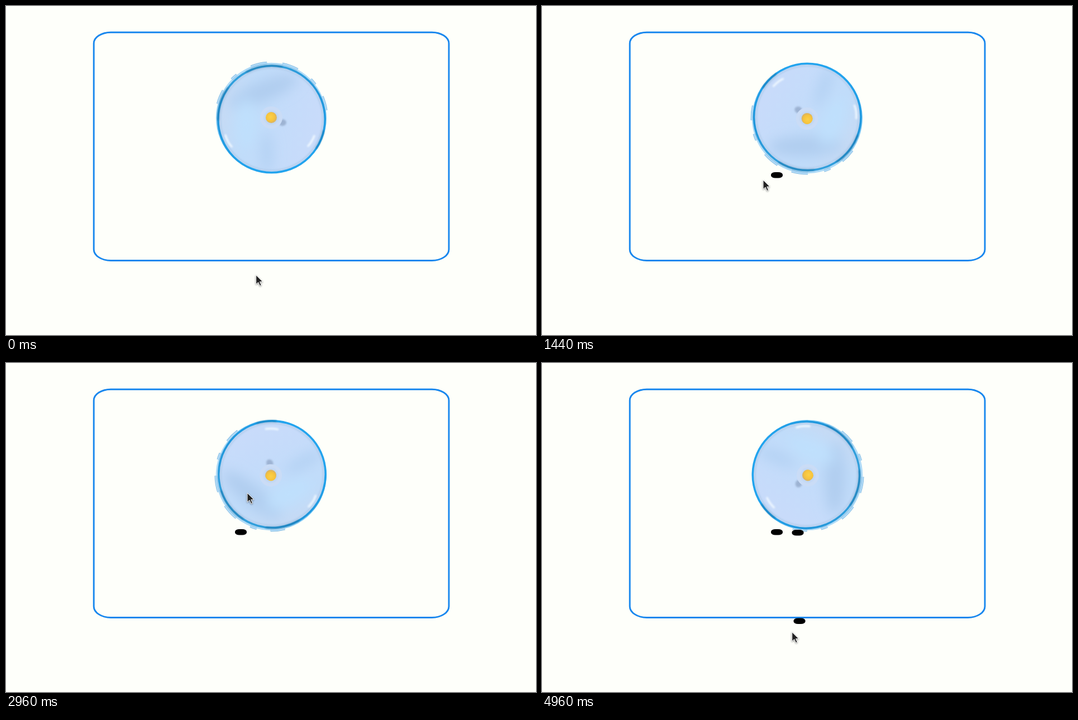
An HTML page that plays this animation: 949x590 px, repeating every 5.12 s.

```html
<!DOCTYPE html>
<html lang="en">
<head>
<meta charset="utf-8">
<title>Spinning wheel</title>
<style>
  html, body { margin: 0; width: 100%; height: 100%; overflow: hidden; background: #fefffa; }
  svg { position: absolute; left: 0; top: 0; }
  .box { fill: none; stroke: #1887ee; stroke-width: 2.9; }
  .edge { fill: none; stroke: #80b8de; stroke-width: 4.5; }
  .grip { fill: none; stroke: #b0daf7; stroke-width: 3; }
  .glint { fill: none; stroke: #eef7ff; stroke-width: 3.5; stroke-linecap: round; }
  .shade { fill: none; stroke: #17679a; stroke-width: 2.5; opacity: .65; }
  #cursor { filter: drop-shadow(0 1.5px 1.5px #0007); }
</style>
</head>
<body>
<svg width="949" height="590" viewBox="0 0 949 590">
  <defs>
    <linearGradient id="lip" x1="0" y1="0" x2="0" y2="1">
      <stop offset=".2" stop-color="#b0dbf7"/>
      <stop offset="1" stop-color="#55bdf6"/>
    </linearGradient>
    <linearGradient id="rim" x1="0" y1="0" x2=".3" y2="1">
      <stop offset="0" stop-color="#3aa3dc"/>
      <stop offset=".5" stop-color="#2096da"/>
      <stop offset="1" stop-color="#22a4ee"/>
    </linearGradient>
    <linearGradient id="face" x1="0" y1=".4" x2="1" y2=".6">
      <stop offset="0" stop-color="#c6daf4"/>
      <stop offset=".3" stop-color="#c0dcfa"/>
      <stop offset="1" stop-color="#c9dbfa"/>
    </linearGradient>
    <radialGradient id="pin" cx=".42" cy=".45">
      <stop offset="0" stop-color="#fbd04a"/>
      <stop offset=".75" stop-color="#f6c33c"/>
      <stop offset="1" stop-color="#dfb65c"/>
    </radialGradient>
    <clipPath id="inside"><circle cx=".5" cy="2" r="95"/></clipPath>
    <filter id="soft" x="-60%" y="-60%" width="220%" height="220%"><feGaussianBlur stdDeviation="11"/></filter>
    <filter id="blur" x="-60%" y="-60%" width="220%" height="220%"><feGaussianBlur stdDeviation="1.4"/></filter>
  </defs>

  <rect class="box" x="157.2" y="47.2" width="635.8" height="409.3" rx="30.5" ry="20"/>

  <g id="wheel">
    <circle cy="-.3" r="99" fill="url(#lip)"/>
    <g id="grips"></g>
    <circle cx=".5" cy="2" r="95.5" fill="url(#face)"/>
    <g clip-path="url(#inside)">
      <g filter="url(#soft)">
        <ellipse cx="5" cy="-50" rx="65" ry="18" fill="#b0cdef" transform="rotate(-22)"/>
        <ellipse cx="-45" cy="10" rx="18" ry="45" fill="#bfe0fd"/>
        <ellipse cx="-8" cy="62" rx="10" ry="38" fill="#b3d1f3"/>
      </g>
      <circle cx=".5" cy="2" r="92" fill="none" stroke="#b3cdec" stroke-width="3" filter="url(#blur)"/>
      <g filter="url(#blur)">
        <path class="glint" d="M-82 31Q-78 44-71 51M77 32Q72 44 66 50"/>
      </g>
    </g>
    <circle cx=".5" cy="2" r="95.7" fill="none" stroke="url(#rim)" stroke-width="3.6"/>
    <path class="shade" filter="url(#blur)" d="M-95 4A95.5 95.5 0 0 1-77-55M-45-82A95.5 95.5 0 0 1 20-92M94 22A95.5 95.5 0 0 1 80 55"/>
    <ellipse cx="20" cy="8" rx="7" ry="6" fill="#9db3d3" filter="url(#blur)"/>
    <circle r="20" cy="-1" fill="#cadcf6"/>
    <circle r="13" cy="-1" fill="#bfd6f3" filter="url(#blur)"/>
    <circle r="10" cy="-1" fill="url(#pin)"/>
  </g>

  <g id="drops"></g>
  <path id="cursor" d="M0 0V16.5L4 13 7 19.5 9.5 18.3 6.8 12H12Z" fill="#222" stroke="#fff" stroke-width="1"/>
</svg>
<script>
  const LOOP = 5120, STEP = 80, SPEED = 0.7; // degrees per ms
  const hovers = [[741, 1028], [2903, 3292]];
  const exits = [...hovers.map(hover => hover[1]), 4530];

  // Time, x, y of the turning points of the pointer
  const stops = [
    [0, 447.7, 482.5], [880, 473.5, 240.5], [1028, 410, 298], [1440, 396, 312],
    [1800, 379, 331], [2400, 399, 273], [2960, 432, 233], [3292, 447.5, 299],
    [3920, 452, 359], [4530, 450.5, 457.5], [4960, 447.7, 482.5]
  ];

  const $ = id => document.getElementById(id);
  const svgEl = (parent, tag, attrs) => {
    const el = document.createElementNS("http://www.w3.org/2000/svg", tag);
    for (const key in attrs) el.setAttribute(key, attrs[key]);
    return parent.appendChild(el);
  };

  // Slope at a stop, zero at both ends
  function slope(i, axis) {
    const before = stops[i - 1], after = stops[i + 1];
    return before && after ? (after[axis] - before[axis]) / (after[0] - before[0]) : 0;
  }

  // Smooth curve through the stops
  function pointer(t) {
    const i = Math.max(0, stops.findIndex(stop => stop[0] >= t) - 1);
    const a = stops[i], b = stops[i + 1];
    const span = b[0] - a[0], u = (t - a[0]) / span, v = 1 - u;
    return [1, 2].map(axis =>
      a[axis] * v * v * (1 + 2 * u) + b[axis] * u * u * (3 - 2 * u) +
      span * u * v * (v * slope(i, axis) - u * slope(i + 1, axis)));
  }

  // The wheel turns only while the pointer is over it
  const angle = t => SPEED * hovers.reduce(
    (sum, [enter, leave]) => sum + Math.max(0, Math.min(t, leave) - enter), 0);

  const rimPoint = deg => {
    const a = deg * Math.PI / 180;
    return `${99.3 * Math.cos(a)} ${99.3 * Math.sin(a)}`;
  };
  for (const side of [-1, 1]) {
    for (const [offset, size] of [[16.5, 17], [45.5, 7], [71, 15]]) {
      const mid = -86.5 + side * offset;
      const d = `M${rimPoint(mid - size / 2)}A99.3 99.3 0 0 1 ${rimPoint(mid + size / 2)}`;
      for (const name of ["edge", "grip"]) svgEl($("grips"), "path", { class: name, d });
    }
  }

  // Each exit leaves a drop at the pointer
  const drops = exits.map(time => {
    const [x, y] = pointer(time);
    return { time, el: svgEl($("drops"), "rect", { x, y, width: 21, height: 10.5, rx: 8, ry: 4.5 }) };
  });

  function draw(now) {
    const t = Math.min(Math.floor(now % LOOP / STEP) * STEP, 4960);
    $("wheel").setAttribute("transform", `translate(475 201) rotate(${angle(t)})`);
    $("cursor").setAttribute("transform", `translate(${pointer(t)})`);
    for (const { time, el } of drops) el.setAttribute("visibility", t >= time ? "visible" : "hidden");
  }

  const start = performance.now();
  function tick() {
    draw(performance.now() - start);
    requestAnimationFrame(tick);
  }
  tick();
</script>
</body>
</html>
```
